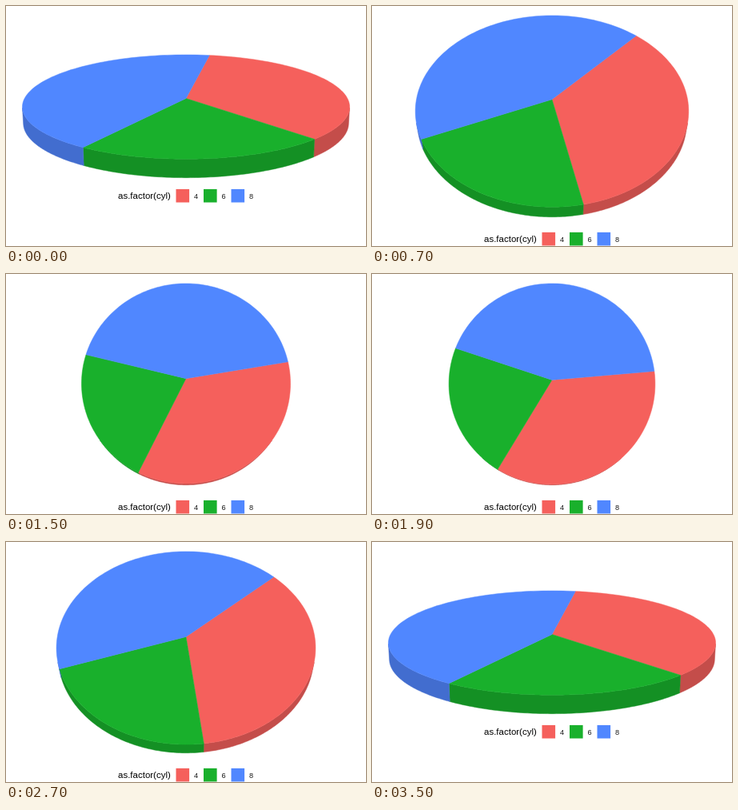
Recreate the animation shown at these times as an HTML page. Size 450 by 300 pixels, loop 3.6 s.

```html
<!DOCTYPE html>
<html lang="en">
<head>
<meta charset="utf-8">
<title>Tilting 3D pie</title>
<style>
  html, body { margin: 0; width: 100%; height: 100%; overflow: hidden; background: #fff; }
  svg { display: block; width: 450px; height: 300px; }
  text { font-family: "Liberation Sans", Arial, sans-serif; font-size: 9.2px; fill: #1a1a1a; }
  .title { font-size: 11.5px; fill: #000; }
  path { stroke-width: .5; stroke-linejoin: round; }
  .red { fill: #f5605c; stroke: #f5605c; }
  .green { fill: #19b02c; stroke: #19b02c; }
  .blue { fill: #5087ff; stroke: #5087ff; }
  .side.red { fill: #c44d4a; stroke: #c44d4a; }
  .side.green { fill: #149024; stroke: #149024; }
  .side.blue { fill: #426dcf; stroke: #426dcf; }
  rect { stroke: none !important; }
</style>
</head>
<body>
<svg viewBox="0 0 450 300">
  <g id="pie"></g>
  <g id="legend">
    <text class="title" x="140" y="4">as.factor(cyl)</text>
    <rect class="red" x="212.5" y="-8.3" width="16.6" height="16.6"/>
    <rect class="green" x="247" y="-8.3" width="16.6" height="16.6"/>
    <rect class="blue" x="281.5" y="-8.3" width="16.6" height="16.6"/>
    <text x="235" y="3.3">4</text>
    <text x="269.5" y="3.3">6</text>
    <text x="304" y="3.3">8</text>
  </g>
</svg>
<script>
const STEP = 100, POSES = 18;
const EYE = 5.8, TOP = 0.1, BASE = -0.005;   // disc radius is 1
const PANEL_W = 409.1, PANEL_H = 251.8, CX = 225, CY = 137.8;
const NAMES = ["red", "green", "blue"];
const rad = deg => deg * Math.PI / 180;

const pie = document.getElementById("pie");
const legend = document.getElementById("legend");
const addPath = cls => {
  const p = document.createElementNS("http://www.w3.org/2000/svg", "path");
  p.setAttribute("class", cls);
  return pie.appendChild(p);
};
const sides = NAMES.map(n => addPath("side " + n));
const tops = NAMES.map(n => addPath(n));

const toPath = pts =>
  "M" + pts.map(p => p[0].toFixed(2) + "," + p[1].toFixed(2)).join("L") + "Z";

function draw(i) {
  const tilt = rad(19.25 + 3.68 * i - 0.005 * i * i);
  const s = Math.sin(tilt), c = Math.cos(tilt);
  const project = (x, y, z) => {
    const depth = EYE + y * c - z * s;
    return [x / depth, (y * s + z * c) / depth];
  };

  // Fit the projected disc into the panel, keeping its aspect ratio
  const high = project(0, 1, TOP)[1];
  const low = Math.min(project(0, -1, BASE)[1], project(0, -1, TOP)[1]);
  const width = 2 / Math.sqrt((EYE - TOP * s) ** 2 - c * c);
  const scale = Math.min(PANEL_W / width, PANEL_H / (high - low));
  const mid = (high + low) / 2;
  const place = (x, y, z) => {
    const p = project(x, y, z);
    return [CX + p[0] * scale, CY - (p[1] - mid) * scale];
  };
  const arc = (a, b, z) => Array.from({ length: 91 }, (_, k) => {
    const t = rad(a + (b - a) * k / 90);
    return place(Math.cos(t), Math.sin(t), z);
  });

  const turn = i * 80 / 17;
  const cuts = [80.3, -45.3, -123.4, -279.7].map(a => a - turn);
  const facing = Math.acos(Math.min(1, 1 / (EYE * c))) * 180 / Math.PI;

  NAMES.forEach((_, k) => {
    const from = cuts[k + 1], to = cuts[k];
    tops[k].setAttribute("d", toPath([place(0, 0, TOP), ...arc(from, to, TOP)]));
    const a = Math.max(from, -90 - facing), b = Math.min(to, -90 + facing);
    sides[k].setAttribute("d", a < b
      ? toPath([...arc(a, b, TOP), ...arc(a, b, BASE).reverse()]) : "");
  });

  const h = (high - low) * scale;
  legend.setAttribute("transform", `translate(0 ${(CY + h * 0.55 + 14.9).toFixed(2)})`);
}

const start = performance.now();
let shown = -1;
function tick(now) {
  const n = Math.floor(Math.max(0, now - start) / STEP) % (2 * POSES);
  const pose = n < POSES ? n : 2 * POSES - 1 - n;
  if (pose !== shown) draw(shown = pose);
  requestAnimationFrame(tick);
}
tick(start);
</script>
</body>
</html>
```
